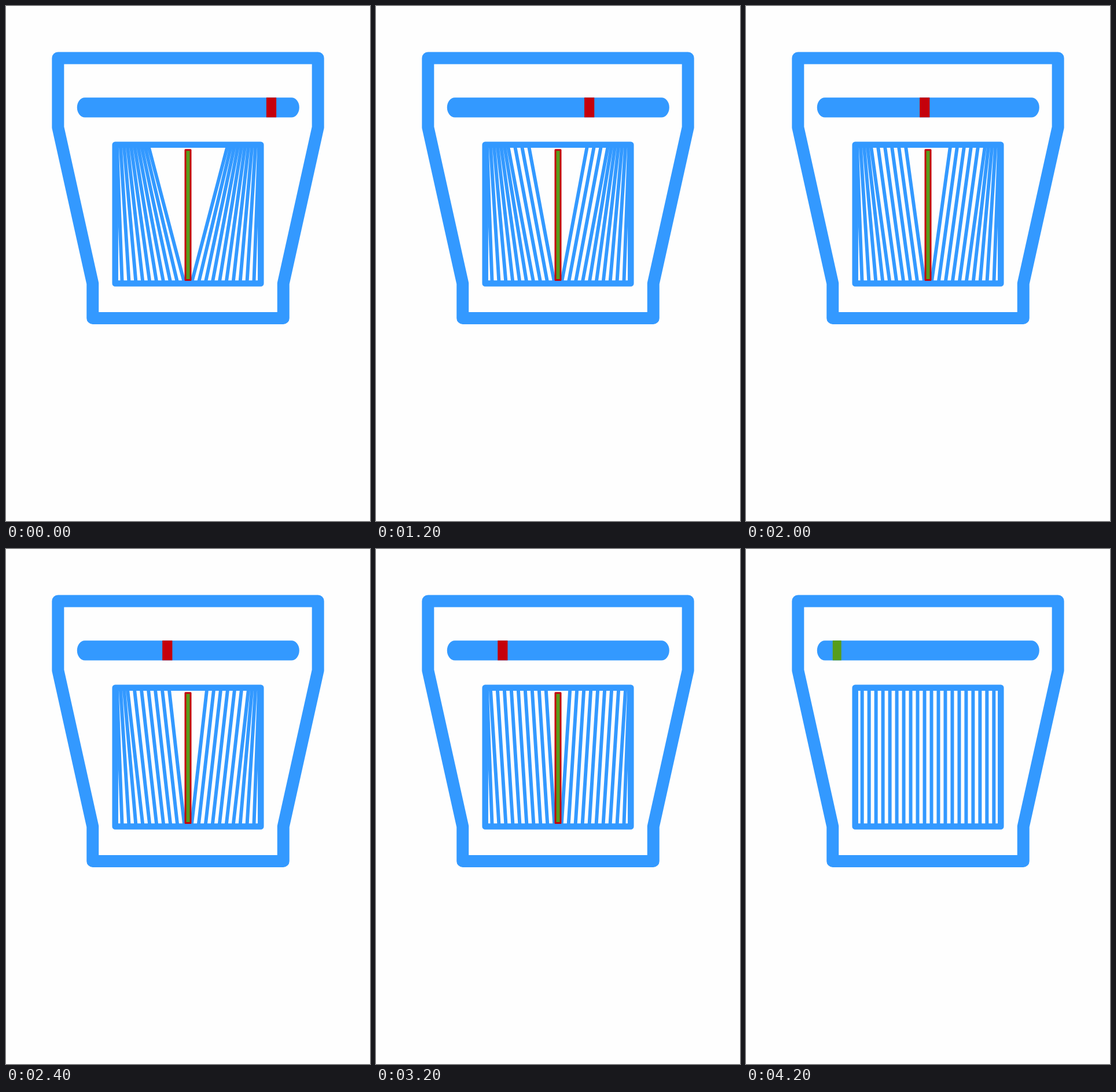
Recreate the animation shown at these times as an HTML page. Size 629 px wide and 890 px high, loop 4400 ms.

```html
<!DOCTYPE html>
<html lang="en">
<head>
<meta charset="utf-8">
<title>Closing blinds</title>
<style>
  html, body { margin: 0; height: 100%; overflow: hidden; background: #fefefe; }
  svg { display: block; width: 100vw; height: 100vh; }
  .outline { fill: none; stroke: #3399ff; stroke-linejoin: round; }
</style>
</head>
<body>
<!-- Units are millimetres on an A4 page -->
<svg viewBox="0 0 210 297" preserveAspectRatio="none">
  <path class="outline" stroke-width="7" d="M30 30H180V70L160 160V180H50V160L30 70Z"/>
  <rect x="41" y="52.8" width="128.2" height="11.4" rx="4.5" ry="5.7" fill="#3399ff"/>
  <rect id="slider" y="52.8" height="11.4"/>
  <path id="slats" class="outline" stroke-width="2"/>
  <rect class="outline" x="63" y="80" width="84" height="80" stroke-width="3.5"/>
  <rect id="rod" x="103.5" y="83" width="3" height="75" fill="#579d1c" stroke="#c5000b" stroke-linejoin="round"/>
</svg>
<script>
  const STEP_MS = 200, STEPS = 22, SLATS_PER_SIDE = 10, PAGE_WIDTH = 210;
  const [slider, slats, rod] = ['slider', 'slats', 'rod'].map(id => document.getElementById(id));

  // Each slat waits in the stack until the one before it is 4 mm ahead.
  function slatPair(i, step) {
    const top = Math.max(82 - 2 * i, 82 + step - 4 * i);
    const bottom = 103 - 4 * i;
    return `M${top} 80L${bottom} 160M${PAGE_WIDTH - top} 80L${PAGE_WIDTH - bottom} 160`;
  }

  function draw(step) {
    const closed = step === STEPS - 1;
    slider.setAttribute('x', closed ? 50 : 150.2 - 5 * step);
    slider.setAttribute('width', closed ? 5 : 5.75);
    slider.setAttribute('fill', closed ? '#579d1c' : '#c5000b');
    rod.setAttribute('visibility', closed ? 'hidden' : 'visible');
    slats.setAttribute('d', Array.from({ length: SLATS_PER_SIDE }, (_, i) => slatPair(i, step)).join(''));
  }

  function tick() {
    draw(Math.floor(performance.now() / STEP_MS) % STEPS);
    requestAnimationFrame(tick);
  }
  tick();
</script>
</body>
</html>
```
